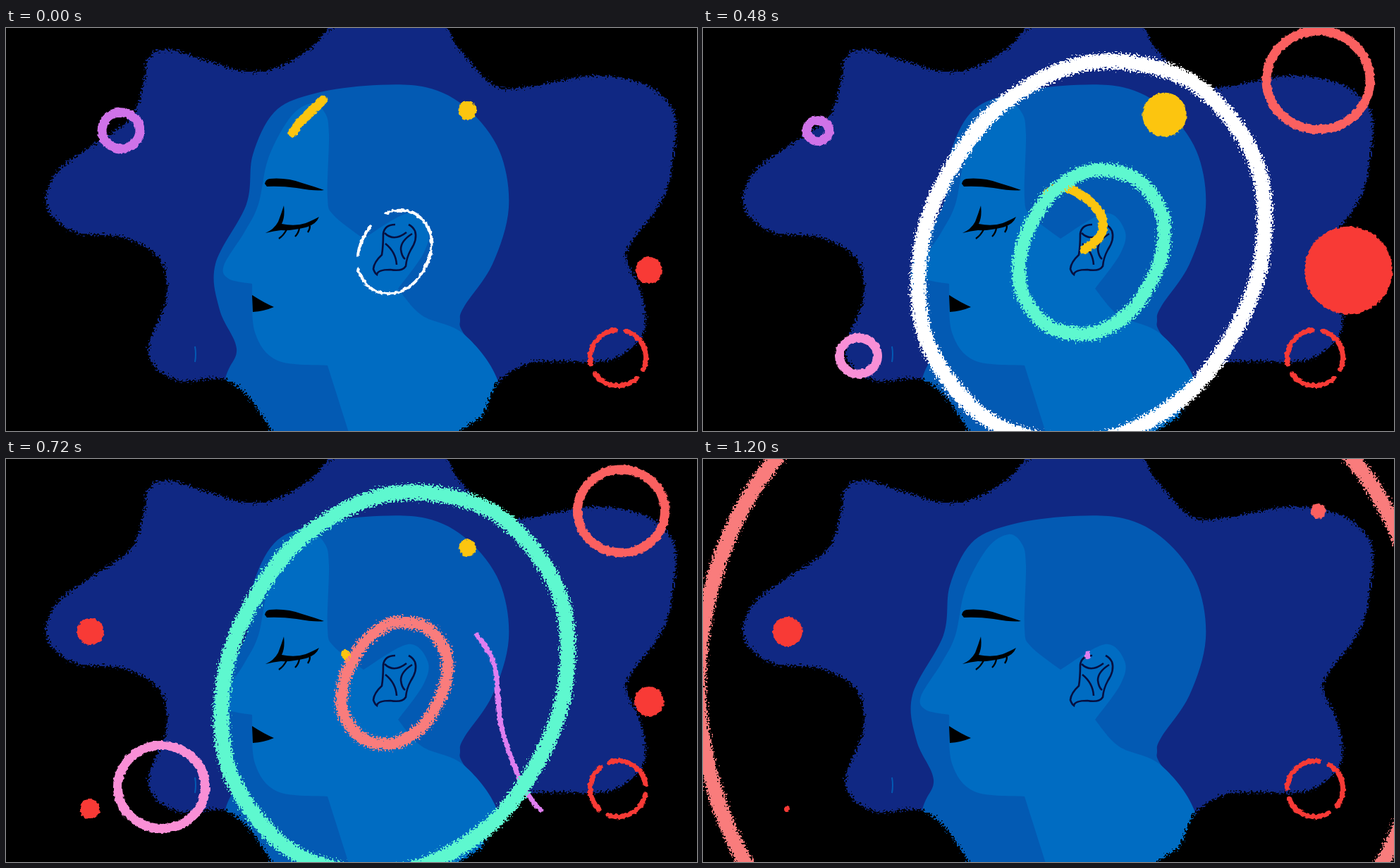
An HTML page that plays this animation: 980x572 px, repeating every 1280 ms.

```html
<!DOCTYPE html>
<html lang="en">
<head>
<meta charset="utf-8">
<title>Listening</title>
<style>
html, body { margin: 0; width: 100%; height: 100%; overflow: hidden; background: #000; }
svg { position: absolute; left: 0; top: 0; }
</style>
</head>
<body>
<svg width="980" height="572" viewBox="0 0 980 572">
  <defs>
    <filter id="grain" filterUnits="userSpaceOnUse" x="-30" y="-30" width="1040" height="632" color-interpolation-filters="sRGB">
      <feTurbulence type="fractalNoise" baseFrequency=".4" seed="4"/>
      <feDisplacementMap in="SourceGraphic" scale="18" xChannelSelector="R" yChannelSelector="G"/>
    </filter>
    <filter id="chalk" filterUnits="userSpaceOnUse" x="-30" y="-30" width="1040" height="632" color-interpolation-filters="sRGB">
      <feTurbulence type="fractalNoise" baseFrequency=".25" seed="9"/>
      <feDisplacementMap in="SourceGraphic" scale="5" xChannelSelector="R" yChannelSelector="G"/>
    </filter>
    <mask id="cloud" maskUnits="userSpaceOnUse" x="0" y="0" width="980" height="572">
      <path id="blob" fill="#fff" filter="url(#grain)"/>
    </mask>
  </defs>
  <g mask="url(#cloud)">
    <rect width="980" height="572" fill="#102883"/>
    <path id="head" fill="#035ab3"/>
    <path id="face" fill="#006cc2"/>
    <path d="M268 452q2 11 0 22" fill="none" stroke="#035ab3" stroke-width="2"/>
  </g>
  <path d="M367 221Q368 215 374 214Q398 212 420 220Q437 225 451 230Q440 232 412 227Q390 224 370 225Z
    M368 291Q380 286 386 275Q391 262 394 252Q396 268 391 278Q410 282 425 277Q437 272 444 268Q440 279 425 283Q405 288 390 287Q380 288 368 291Z
    M349 379Q366 390 380 396Q366 402 350 403Z"/>
  <path d="M398 286q-4 8-11 13M416 284q-1 7-6 12M431 281q0 5-3 9" fill="none" stroke="#000" stroke-width="2.2"/>
  <path d="M552 279Q537 279 535 292Q535 310 533 322Q522 332 521 342Q523 348 526 350Q527 343 545 343Q562 346 567 338Q568 326 574 315Q584 300 580 288Q577 282 571 279M537 291Q550 304 568 290M538 306Q553 318 554 336M576 292Q560 302 560 314Q561 324 566 328"
    fill="none" stroke="#060f40" stroke-width="2.6"/>
  <g id="small" filter="url(#chalk)" fill="none" stroke-linecap="round"></g>
  <g id="rough" filter="url(#grain)" fill="none" stroke-linecap="round"></g>
</svg>
<script>
const STEP = 80, STEPS = 16, DEG = Math.PI / 180;
const RED = '#f83a36', YELLOW = '#fcc50f';
const $ = id => document.getElementById(id);
const polar = (x, y, r, deg) => [x + r * Math.cos(deg * DEG), y + r * Math.sin(deg * DEG)];

// Smooth path through [x, y] points; a repeated point makes a corner.
function curve(p, closed) {
  const n = p.length;
  const pt = i => p[closed ? (i + n) % n : Math.max(0, Math.min(n - 1, i))];
  let d = `M${pt(0)}`;
  for (let i = 0; i < (closed ? n : n - 1); i++) {
    const [a, b, c, e] = [pt(i - 1), pt(i), pt(i + 1), pt(i + 2)];
    d += `C${b.map((v, j) => v + (c[j] - a[j]) / 6)} ${c.map((v, j) => v - (e[j] - b[j]) / 6)} ${c}`;
  }
  return d + (closed ? 'Z' : '');
}
const points = s => s.trim().split(/\s+/).map(p => p.split(',').map(Number));
const outline = (id, s) => $(id).setAttribute('d', curve(points(s), true));

// Linear value between keys [step, value, step, value, ...]; 0 outside them.
function at(keys, k) {
  for (let i = 0; i < keys.length; i += 2) {
    const [k0, v0, k1, v1] = keys.slice(i, i + 4);
    if (k === k0) return v0;
    if (k > k0 && k < k1) return v0 + (v1 - v0) * (k - k0) / (k1 - k0);
  }
  return 0;
}

outline('blob', `478,-6 610,-6 640,27 690,80 730,85 820,69 870,71 910,82 938,105 950,140 935,235 886,305 880,330
  900,375 905,430 860,470 775,473 738,477 697,503 675,550 643,574 600,640 420,640 378,574 345,525 308,498
  240,499 202,460 228,382 217,326 165,297 97,289 58,253 72,205 125,165 175,130 194,85 203,42 230,31 290,48
  335,61 380,58 430,31`);
outline('head', `311,498 327,455 303,400 297,335 341,250 350,180 380,120 430,95 510,82 595,84 655,115 700,175
  713,255 690,335 650,395 644,415 650,435 699,505 700,600 290,600`);
outline('face', `433,107 403,127 372,185 358,250 338,290 309,337 316,356 349,363 349,363 353,432 385,472
  456,479 456,479 488,580 488,580 700,600 699,505 650,435 590,408 556,370 556,370 592,320 598,287 570,263
  507,299 507,299 465,266 456,240 458,150 452,120`);

// A wave leaving the ear: a tilted, slightly squashed circle that grows with age.
const RADII = [55, 67, 79, 108, 142, 195, 256, 358, 519];
const GAPS = { 0: '156 19 47 30 108', 1: '196 20 144', 7: '237 60 63' };

function wave(age, color) {
  if (!RADII[age]) return '';
  const x = at([0, 551, 6, 551, 7, 525, 8, 512], age), y = age === 7 ? 300 : 318;
  const squash = at([0, .12, 2, .15, 4, .1, 7, .09, 8, 0], age), tilt = age < 7 ? 118 : 160;
  const ringPoints = Array.from({ length: 12 }, (_, i) =>
    polar(x, y, RADII[age] * (1 + squash * Math.cos(2 * (i * 30 - tilt) * DEG)), i * 30));
  return `<path d="${curve(ringPoints, true)}" pathLength="360" stroke-dasharray="${GAPS[age] || 'none'}"
    stroke="${color}" stroke-width="${at([0, 4, 1, 6, 2, 17, 4, 22, 8, 22], age)}"/>`;
}

const dot = (x, y, w, color) => `<circle cx="${x}" cy="${y}" r="${w / 2}" fill="${color}"/>`;

// A hoop pops up with an overshoot, holds, and shrinks after step `last`.
function hoop(x, y, born, last, k, color) {
  const w = k > last ? at([1, 67, 3, 22], k - last) : at([0, 22, 1, 67, 2, 90, 3, 160, 4, 137, 16, 137], k - born);
  if (!w) return '';
  const line = Math.min(13, w / 2), r = (w - line) / 2;
  return `<ellipse cx="${x}" cy="${y}" rx="${r}" ry="${r * .95}" stroke="${color}" stroke-width="${line}"/>`;
}

const streak = (d, tail, head, color, w) => head ?
  `<path d="${d}" pathLength="100" stroke-dasharray="${head - tail} 200" stroke-dashoffset="${-tail}" stroke="${color}" stroke-width="${w}"/>` : '';

// Three arcs turning anticlockwise, fast at first.
function dashes(k) {
  const turn = at([0, -84, 4, -182, 13, -283, 16, -324], k);
  return [0, 120, 240].map(a =>
    `<path d="M${polar(868, 468, 39.5, turn + a + 11)}A39.5 39.5 0 0 1 ${polar(868, 468, 39.5, turn + a + 109)}" stroke="${RED}" stroke-width="7"/>`).join('');
}

// A red disc that swells and shrinks, drifting right at its largest.
function disc(x, y, k) {
  const w = at([3, 38, 4, 42, 7, 166, 9, 42], k);
  return dot(x + w * w / 4000, y, w, RED);
}

const spiral = curve(points('450,102 407,148 383,220 421,293 490,335 560,299 560,258 510,226 473,255 490,289'));
const strand = curve(points('832,518 754,494 705,390 690,285 640,226 600,220 553,264 545,281'));
const WAVES = [[0, '#fff'], [3, '#5ef8cf'], [7, '#f97c7c']];

function draw(k) {
  const waves = thin => WAVES.map(([born, color]) => (k - born < 2) === thin ? wave(k - born, color) : '').join('');
  $('small').innerHTML =
    dashes(k) +
    disc(911.5, 344, Math.max(k, 3)) +
    disc(119.5, 245, k - 6) +
    dot(119, 497, at([7, 14, 11, 42, 13, 17, 15, 8], k), RED) +
    dot(654.5, 117 + Math.min(k, 9), at([0, 26, 4, 74, 7, 57, 9, 24, 11, 14, 12, 7], k), YELLOW) +
    hoop(163, 145.5, -1, 4, k, '#cf72e8') +
    hoop(220.5, 465.5, 5, 10, k, '#f98fd6') +
    hoop(872.5, 74, 3, 12, k, '#fb6060') +
    streak(spiral, at([0, 0, 4, 39, 7, 74, 9, 97.5], k), at([0, 11, 4, 67, 7, 100, 9, 100], k), YELLOW, 13) +
    streak(strand, at([7, 0, 9, 15, 11, 37, 13, 82, 15, 99], k), at([7, 16, 9, 68, 11, 84, 13, 96, 15, 100], k), '#df7ef0', 7) +
    waves(true);
  $('rough').innerHTML = waves(false);
}

const start = performance.now();
let shown = -1;
function tick() {
  const k = Math.floor((performance.now() - start) / STEP) % STEPS;
  if (k !== shown) draw(shown = k);
  requestAnimationFrame(tick);
}
tick();
</script>
</body>
</html>
```
